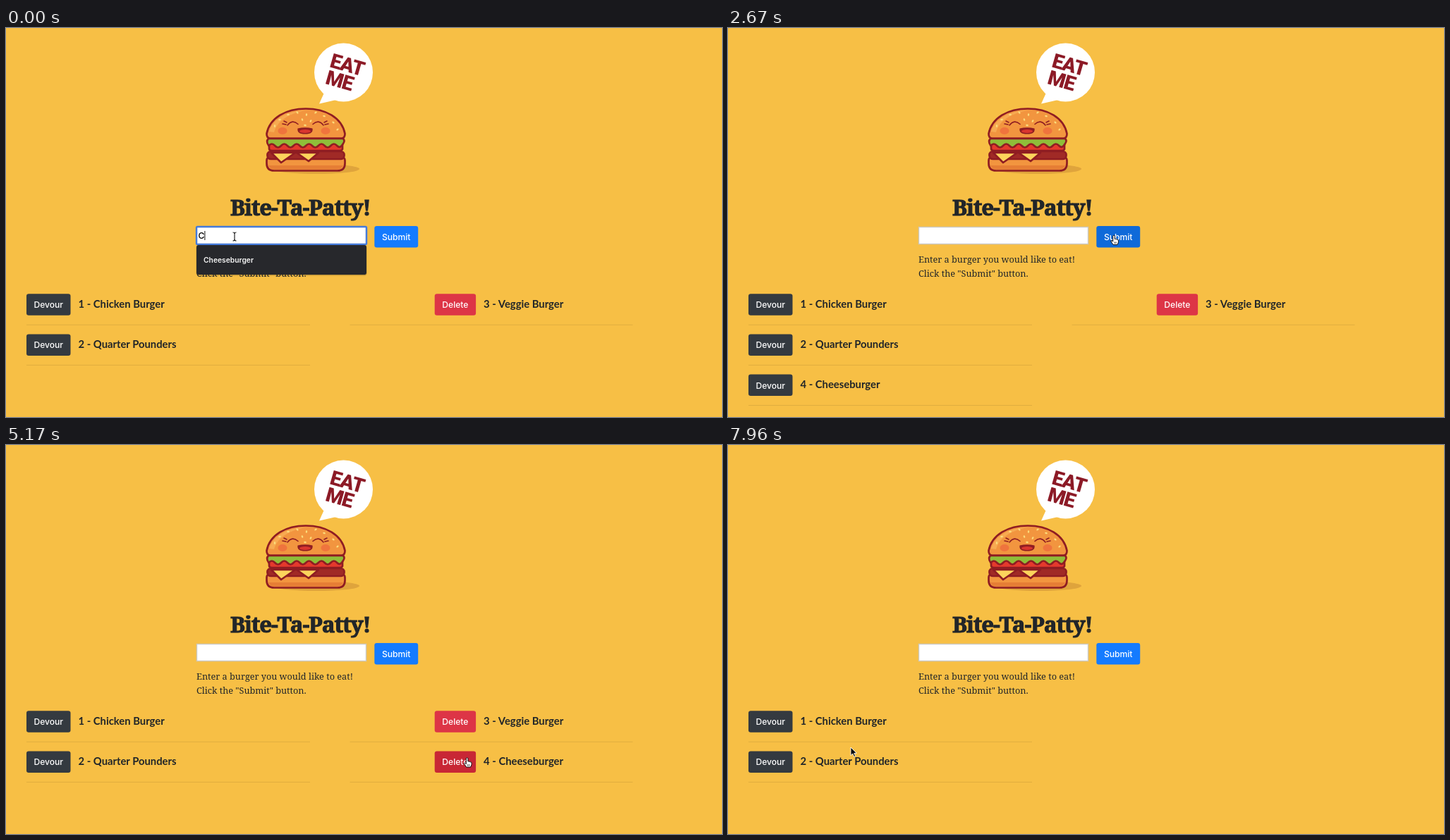
An HTML page that plays this animation: 1015 by 552 pixels, repeating every 8000 ms.

```html
<!DOCTYPE html>
<html lang="en">
<head>
<meta charset="utf-8">
<title>Burger list</title>
<style>
  html, body { margin: 0; width: 100%; height: 100%; overflow: hidden; background: #f7bf45; }
  svg { display: block; width: 100%; height: 100%; }
  text { fill: #212529; }
  .ui { font: 500 12.1px Inter, Roboto, sans-serif; }
  .label { fill: #fff; text-anchor: middle; }
  .typed { fill: #000; }
  .preview { font-size: 8.7px; fill: #000; }
  .option { font-size: 10.3px; font-weight: 600; fill: #f4f4f4; }
  .item { font: 700 14.8px Lato, "Open Sans", sans-serif; }
  .note { font: 500 12.7px "Noto Serif", serif; }
  .title { font: 900 31.4px "Noto Serif", serif; letter-spacing: -1.2px; stroke: #212529; stroke-width: 1; }
  .shout { font: 900 28.5px Roboto, Inter, sans-serif; letter-spacing: -1.2px; fill: #8c1a26; text-anchor: middle; }
  .ink { stroke: #8f1d22; stroke-width: 2.7; stroke-linejoin: round; stroke-linecap: round; }
  .thin { fill: none; stroke-width: 1.6; }
</style>
</head>
<body>
<svg viewBox="0 0 1015 552">
  <!-- speech bubble -->
  <circle cx="478.5" cy="63" r="41.5" fill="#fff"/>
  <path d="M451 92L444 107.5L468 102Z" fill="#fff"/>
  <g transform="translate(478.5 63) rotate(16)">
    <text class="shout" x="2" y="-2">EAT</text>
    <text class="shout" x="-2.5" y="22.5">ME</text>
  </g>

  <!-- burger -->
  <ellipse cx="440" cy="200" rx="61" ry="7" fill="#dfa43c"/>
  <path class="ink" d="M373 184H477Q480.500 184 480.500 188V192Q480.500 202.500 470 202.500H380Q369.500 202.500 369.500 192V188Q369.500 184 373 184Z" fill="#f2953f"/>
  <path d="M372 195Q374 200.500 381 201H469Q476 200.500 478 195Z" fill="#e67e35"/>
  <rect class="ink" x="370.500" y="175" width="109" height="11" rx="5" fill="#a02a26"/>
  <path class="ink" d="M373 164H477V172Q476 174 473 174H377Q373 174 373 171Z" fill="#e5392d"/>
  <path class="ink" d="M376 177H410L390 191Z" fill="#fcd45c"/>
  <path class="ink" d="M412 177H443L429 189Z" fill="#fcd45c"/>
  <path class="ink" d="M372 157H478Q481 160 478 164q-4.400 8-8.800 3t-8.800 0-8.800 0-8.800 0-8.800 0-8.800 0-8.800 0-8.800 0-8.800 0-8.800 0-8.800 0-8.800 0Q368 161 372 157Z" fill="#8fbd39"/>
  <path class="ink" d="M374 156.500Q369.500 156 369.500 150C374 127 397 114.500 425 114.500S476 127 480.500 150Q480.500 156 476 156.500Z" fill="#f2953f"/>
  <path d="M373 147C379 128 400 117 425 117C397 122 384 134 380 148Z" fill="#f7ab52"/>
  <g fill="#ef743d">
    <ellipse cx="392" cy="146" rx="6.500" ry="5"/>
    <ellipse cx="453" cy="146" rx="6.500" ry="5"/>
  </g>
  <path class="ink thin" d="M399 138Q406 129 414 136.500M392 136L397 137M394 132L398 134M435 136.500Q443 129 450 138M457 136L452 137M455 132L451 134"/>
  <path d="M413.500 142.500Q424 140 434.500 142.500Q436 150.500 424 150.500T413.500 142.500Z" fill="#8f1d22"/>
  <ellipse cx="424" cy="146.500" rx="8" ry="2.600" fill="#d9352f"/>
  <g id="seeds" fill="#fbdc7c"></g>

  <text class="title" x="318" y="266">Bite-Ta-Patty!</text>
  <text class="note" x="270" y="333">Enter a burger you would like to eat!</text>
  <text class="note" x="270" y="352.500">Click the "Submit" button.</text>
  <g id="live"></g>
</svg>
<script>
const LOOP = 8000, STEP = 147.4;
const live = document.getElementById('live');

const SEEDS = [[400, 123], [413, 120], [426, 123], [439, 120], [451, 125], [420, 130], [432, 132],
  [388, 130], [464, 134], [381, 139], [470, 144], [424, 138]];
document.getElementById('seeds').innerHTML = SEEDS.map(([x, y], i) =>
  `<ellipse cx="${x}" cy="${y}" rx="1.9" ry="1.2" transform="rotate(${i * 50} ${x} ${y})"/>`).join('');

// Pointer path: step, x, y
const PATH = [[0, 324, 290], [6, 324, 290], [9, 342, 330], [11, 342, 330], [14, 547, 294.5],
  [18, 547, 294.5], [23, 69, 496], [26, 69, 496], [30, 587, 446], [32, 673, 450], [36, 650, 443],
  [40, 649, 397.5], [51, 649, 397.5], [54, 174, 429]];

// Colours: normal, hover, pressed, focus ring
const LOOK = {
  Submit: ['#147bff', '#0f6ad9', '#0a62cc', '#268fff'],
  Devour: ['#343a40', '#262a2f', '#1d2124', '#52585d'],
  Delete: ['#dd3546', '#c82735', '#bd2130', '#e15361']
};

const POINTERS = {
  beam: '<path d="M-2.500 0Q0 0 0 2V10Q0 12 -2.500 12M2.500 0Q0 0 0 2V10Q0 12 2.500 12" fill="none" stroke="#222" stroke-width="1.200"/>',
  arrow: '<path d="M0 0V11.500L2.700 9L4.800 13.400L6.700 12.500L4.700 8.300H8.300Z" stroke="#fff" stroke-width=".9"/>',
  hand: '<path d="M-1.300 1Q-1.200 -.3 0 -.3T1.300 1V5Q2.300 4.200 3.200 5.300Q4.300 4.700 4.900 5.800Q6.400 5.500 6.400 7.200V9.500L5 13H-1L-4 8.500Q-4.500 7 -3 7L-1.300 8.500Z" fill="#fff" stroke="#111"/><path d="M1 9V11.500M3 9V11.500" stroke="#111" stroke-width=".8"/>'
};

const rect = (x, y, w, h, attrs) => `<rect x="${x}" y="${y}" width="${w}" height="${h}" ${attrs}/>`;
const text = (x, y, cls, s) => `<text x="${x}" y="${y}" class="${cls}">${s}</text>`;
const inside = (p, x, y, w, h) => p.x >= x && p.x <= x + w && p.y >= y && p.y <= y + h;

function pointerAt(k) {
  const i = Math.max(1, PATH.findIndex(p => p[0] >= k));
  const [k0, x0, y0] = PATH[i - 1], [k1, x1, y1] = PATH[i];
  const u = (k - k0) / (k1 - k0), e = u * u * (3 - 2 * u);
  return { x: x0 + (x1 - x0) * e, y: y0 + (y1 - y0) * e, kind: 'arrow' };
}

function button(name, x, y, w, p, state) {
  const over = inside(p, x, y, w, 30.5);
  if (over) p.kind = 'hand';
  const [normal, hover, pressed, ring] = LOOK[name];
  const down = over && state.press;
  const fill = down ? pressed : over && state.hover ? hover : normal;
  return (down ? rect(x - 1.3, y - 1.3, w + 2.6, 33.1, `rx="4" fill="none" stroke="${ring}" stroke-opacity=".5" stroke-width="2.6"`) : '')
    + rect(x, y, w, 30.5, `rx="3.200" fill="${fill}"`)
    + text(x + w / 2, y + 20, 'ui label', name);
}

function list(items, action, x, w, lineX, lineW, p, state) {
  return items.map((item, i) => {
    const y = 377.3 + i * 57.1;
    return button(action, x, y, w, p, state)
      + text(x + w + 11, y + 19.3, 'item', item)
      + rect(lineX, y + 43.5, lineW, .8, 'fill="#000" fill-opacity=".12"');
  }).join('');
}

function field(k, p) {
  const open = k < 11, focused = k < 18;
  const lit = open && inside(p, 270, 314.5, 241, 29.5);
  if (inside(p, 270, 282, 241, 25)) p.kind = 'beam';
  const fill = focused && (lit || !open) ? '#e8f0fe' : '#fff';
  let out = rect(270.5, 282.5, 240, 24, `fill="${fill}" stroke="#cbc8c0" stroke-width="1.4"`);
  if (focused) {
    out += rect(270, 282, 241, 25, 'rx="1.500" fill="none" stroke="#447bdc" stroke-width="2.400"');
    out += lit ? text(272.5, 299.3, 'ui preview', 'Cheeseburger')
      : text(272.5, 299, 'ui typed', 'Cheeseburger'.slice(0, open ? [1, 2, 3, 3, 4][Math.min(k, 4)] : 12));
    if (open && !lit) out += '<path id="caret" d="M0 288V301" stroke="#111"/>';
  }
  if (open) {
    out += rect(269.5, 308.5, 242, 43, 'rx="4" fill="#000" fill-opacity=".2"')
      + rect(270, 308, 241, 42, 'rx="3" fill="#27282c"')
      + (lit ? rect(270, 314.5, 241, 29.5, 'fill="#4b4c50"') : '')
      + text(280, 333, 'ui option', 'Cheeseburger');
  }
  return out;
}

function draw(k) {
  const p = pointerAt(k);
  const state = { press: [17, 25, 41, 51].includes(k), hover: k < 42 || k > 45 };
  const eaten = [];
  if (k < 42) eaten.push('3 - Veggie Burger');
  if (k >= 26 && k < 52) eaten.push('4 - Cheeseburger');
  const fresh = ['1 - Chicken Burger', '2 - Quarter Pounders'];
  if (k >= 18 && k < 26) fresh.push('4 - Cheeseburger');

  live.innerHTML = field(k, p)
    + button('Submit', 522.3, 281, 61.9, p, state)
    + list(fresh, 'Devour', 29, 62.5, 29, 402, p, state)
    + list(eaten, 'Delete', 607.7, 58.4, 487.5, 401, p, state)
    + `<g transform="translate(${p.x} ${p.y})">${POINTERS[p.kind]}</g>`;

  const caret = document.getElementById('caret');
  if (caret) {
    const x = 273 + live.querySelector('.typed').getComputedTextLength();
    caret.setAttribute('transform', `translate(${x} 0)`);
  }
}

const start = performance.now();
let shown = -1;
function tick() {
  const k = Math.floor((performance.now() - start) % LOOP / STEP);
  if (k !== shown) draw(shown = k);
  requestAnimationFrame(tick);
}
tick();
</script>
</body>
</html>
```
